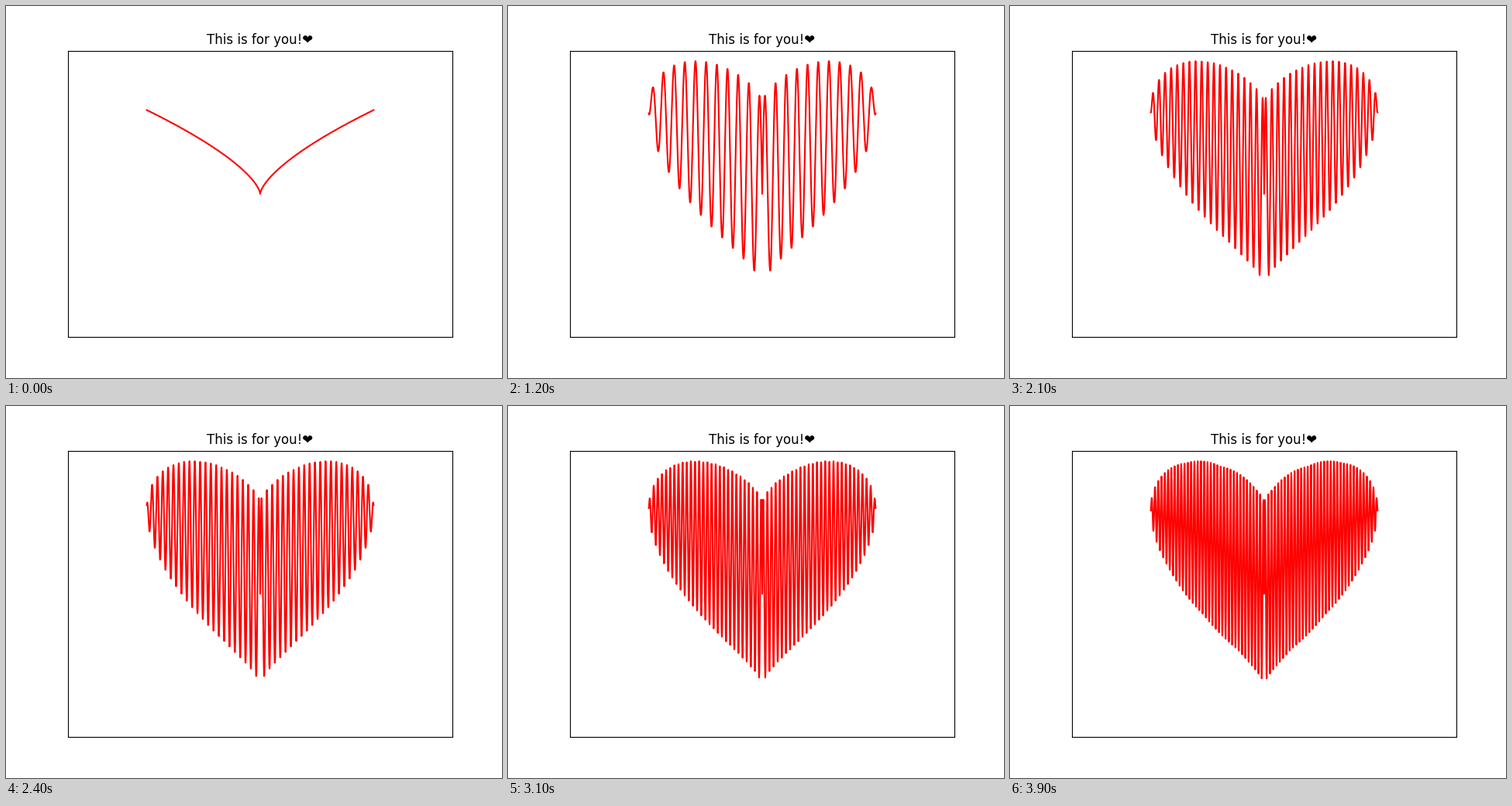
Write a matplotlib script that moves like this. It is 640 px wide and 480 px high and loops after 4000 ms.

```python
import numpy as np
import matplotlib.pyplot as plt
from matplotlib.animation import FuncAnimation

FRAMES = 40
INTERVAL = 100  # ms
STEP = 0.003
HALF = 590  # samples on each side of the centre

x = STEP * np.arange(-HALF, HALF + 1)
dist = np.abs(x)
base = dist ** (2 / 3)
envelope = 0.9 * np.sqrt(np.pi - x ** 2)


def heart(k):
    """Heart curve whose fill oscillates with frequency k."""
    return base + envelope * np.sin(k * np.pi * dist)


fig, ax = plt.subplots(figsize=(6.4, 4.8), dpi=100)
ax.set(xlim=(-3, 3), ylim=(-2.5, 2.5), xticks=[], yticks=[])
ax.set_title("This is for you!\u2764", fontname="DejaVu Sans", fontsize=12)
line, = ax.plot(x, heart(0), color="red", lw=1.5)


def update(frame):
    line.set_ydata(heart(frame))
    return line,


anim = FuncAnimation(fig, update, frames=FRAMES, interval=INTERVAL,
                     repeat=True, repeat_delay=0)
plt.show()
```
